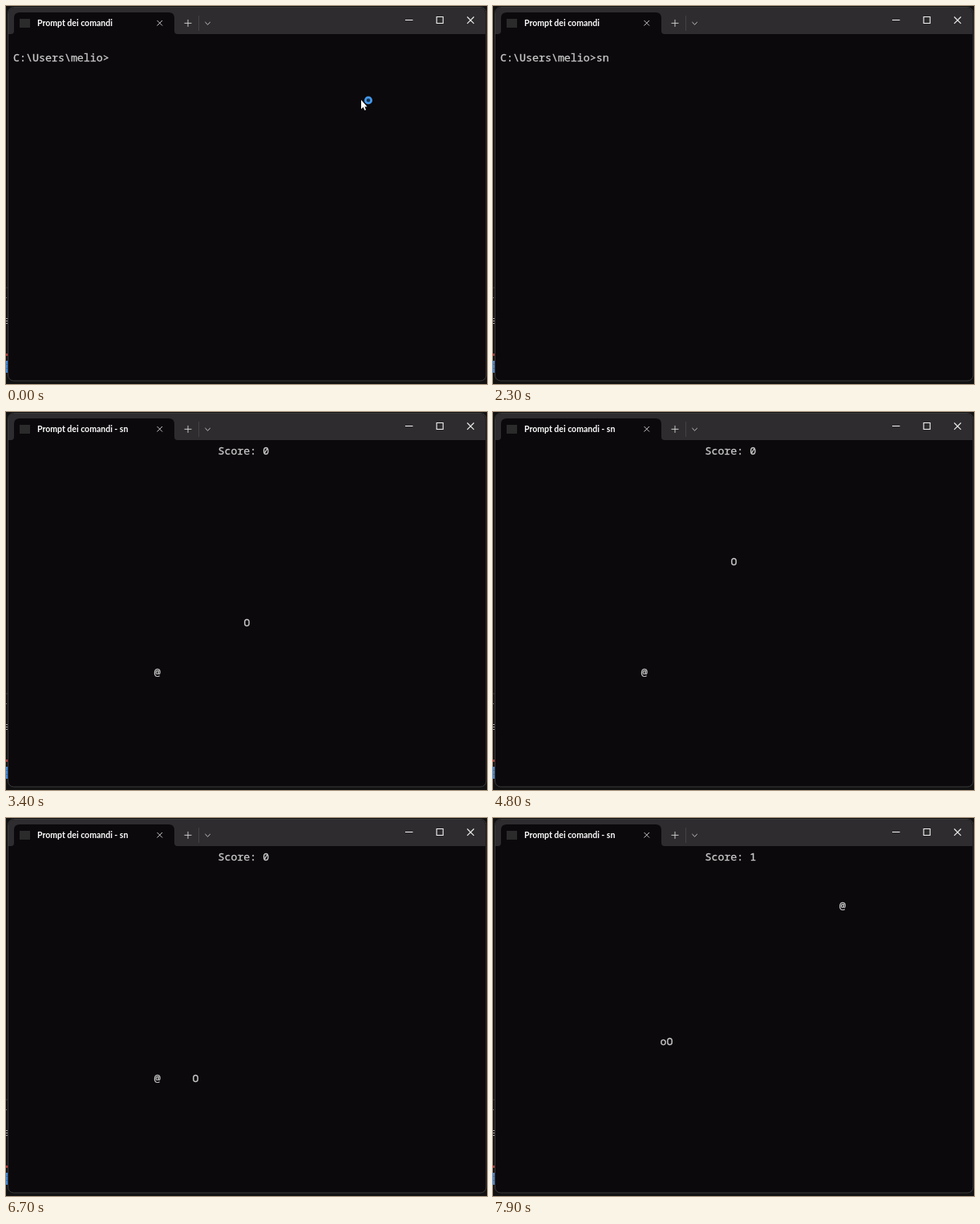
An HTML page that plays this animation: 600x471 px, repeating every 8000 ms.

```html
<!DOCTYPE html>
<html lang="it">
<head>
<meta charset="utf-8">
<title>Terminal snake</title>
<style>
  html, body { margin: 0; width: 100%; height: 100%; overflow: hidden; background: #121212; }
  svg { display: block; width: 600px; height: 471px; }
  .title { font: 700 10.5px Lato, "Open Sans", sans-serif; fill: #fff; }
  .term {
    font: 500 13.3px "Noto Sans Mono", "DejaVu Sans Mono", monospace;
    fill: #ccc; stroke: #ccc; stroke-width: .3;
  }
  .icon { fill: none; stroke: #f2f2f2; stroke-width: 1.1; }
  .small { stroke: #d8d8d8; stroke-width: .9; }
</style>
</head>
<body>
<svg viewBox="0 0 600 471">
  <!-- desktop slivers behind the window -->
  <rect width="600" height="471" fill="#121212"/>
  <path d="M0 351h2" stroke="#333"/>
  <path d="M0 363.5h1" stroke="#888"/>
  <path d="M0 389.5h2M0 392.5h2M0 395.5h2" stroke="#aaa"/>
  <path d="M0 434.5h3" stroke="#b03a35" stroke-width="3"/>
  <rect y="442" width="3" height="15" fill="#3d8be0"/>
  <path d="M0 446.5h3M0 451.5h3" stroke="#2a6fbd"/>

  <!-- window -->
  <rect x="2.5" y="1.5" width="596.5" height="465.5" rx="7" fill="#0c090c" stroke="#3b3a3b"/>
  <path d="M3 35V9q0-7 7-7h581q7 0 7 7v26z" fill="#2e2c2e"/>
  <path d="M6 35q4 0 4-4V15q0-7 7-7h186q7 0 7 7v16q0 4 4 4z" fill="#0c090c"/>
  <rect x="17" y="16" width="13" height="11" fill="#2b2b2b"/>
  <text id="title" class="title" x="39" y="25"></text>
  <path class="icon small" d="M188.5 18l6.5 6.5m0-6.5l-6.5 6.5M222.5 21.4h9M227 16.9v9M248.4 20l3.2 3.2l3.2-3.2"/>
  <path d="M240.5 12v19" stroke="#444244"/>
  <path class="icon" d="M498 17.5h9.5M537.2 13.5h8v8h-8zM575.3 13.5l8.4 8.4m0-8.4l-8.4 8.4"/>

  <g id="screen" class="term"></g>
  <rect id="caret" width="1" height="15" fill="#c8c8c8"/>
  <path id="pointer" d="M443 117v11.5l2.6-2.4l1.8 3.9l1.7-.8l-1.8-3.7h3.2z" fill="#fff"/>
  <circle id="busy" cx="452" cy="117.5" r="3.7" fill="#17324f" stroke="#4398ea" stroke-width="2.7"/>
</svg>
<script>
const LOOP = 8000, TICK = 100;
const TYPED = 1100, LAUNCH = 2400, GAME = 3400;
const LEFT = 9.1, BASELINE = 53.2, CELL = 7.98, LINE = 15.3;
const $ = id => document.getElementById(id);

const SHELL = 'C:\\Users\\melio>';
const INTRO = `Windows PowerShell
Copyright (C) Microsoft Corporation. Tutti i diritti riservati.

Installa la versione più recente di PowerShell per nuove funzionalità e
 miglioramenti. https://aka.ms/PSWindows`.split('\n');

// corners of the snake's path, starting mid-board
const ROUTE = [[36, 14], [36, 5], [31, 5], [31, 18], [19, 18], [19, 15], [26, 15]];
// key points of its progress: time, cells travelled
const PACE = [[GAME, 0], [4700, 0], [4800, 5], [5300, 12], [5900, 19], [6500, 28], [6700, 30], [LOOP - TICK, 49]];
const MEAL = 36;

const within = (t, start, end) => t >= start && t < end;

function travelled(t) {
  const i = Math.max(1, PACE.findIndex(key => t <= key[0]));
  const [t0, d0] = PACE[i - 1], [t1, d1] = PACE[i];
  return Math.floor(d0 + (d1 - d0) * (t - t0) / (t1 - t0) + .3);
}

function along(distance) {
  for (let i = 1; i < ROUTE.length; i++) {
    const [x, y] = ROUTE[i - 1], [x2, y2] = ROUTE[i];
    const length = Math.abs(x2 - x) + Math.abs(y2 - y);
    if (distance <= length) {
      return [x + Math.sign(x2 - x) * distance, y + Math.sign(y2 - y) * distance];
    }
    distance -= length;
  }
  return ROUTE[ROUTE.length - 1];
}

function shellLines(t) {
  const prompt = SHELL + (t >= TYPED ? 'sn' : '');
  const output = t >= LAUNCH ? INTRO : [];
  return [prompt, ...output].map((text, i) => {
    const indent = text.length - text.trimStart().length;
    return [indent, i + 1, text.trim()];
  });
}

function gameLines(t) {
  const distance = travelled(t);
  const fed = distance >= MEAL;
  const lines = [
    [32, 0, 'Score: ' + (fed ? 1 : 0)],
    fed ? [53, 4, '@'] : [22, 18, '@'],
    [...along(distance), 'O']
  ];
  if (distance > MEAL) lines.push([...along(distance - 1), 'o']);
  return lines;
}

function caretCell(t) {
  if (within(t, 700, 1800)) return [t < TYPED ? 15 : 17, 1];
  if (within(t, LAUNCH, 2700)) return [0, 8];
  if (within(t, 2800, GAME)) return [0, 0];
  return null;
}

function print([col, row, text]) {
  const node = document.createElementNS('http://www.w3.org/2000/svg', 'text');
  node.setAttribute('x', LEFT + col * CELL);
  node.setAttribute('y', BASELINE + row * LINE);
  node.textContent = text;
  return node;
}

const show = (node, visible) => node.setAttribute('visibility', visible ? 'visible' : 'hidden');

let lastTick = -1;
function draw(now) {
  const t = Math.floor(now % LOOP / TICK) * TICK;
  if (t !== lastTick) {
    lastTick = t;
    $('title').textContent = 'Prompt dei comandi' + (t >= LAUNCH ? ' - sn' : '');
    $('screen').replaceChildren(...(t < GAME ? shellLines(t) : gameLines(t)).map(print));

    const caret = caretCell(t);
    show($('caret'), caret);
    if (caret) {
      $('caret').setAttribute('x', Math.round(9 + caret[0] * CELL));
      $('caret').setAttribute('y', Math.round(41 + caret[1] * LINE));
    }
    show($('pointer'), t < 700 || within(t, TYPED, 1800));
    show($('busy'), t < TICK);
  }
  requestAnimationFrame(draw);
}
draw(performance.now());
</script>
</body>
</html>
```
